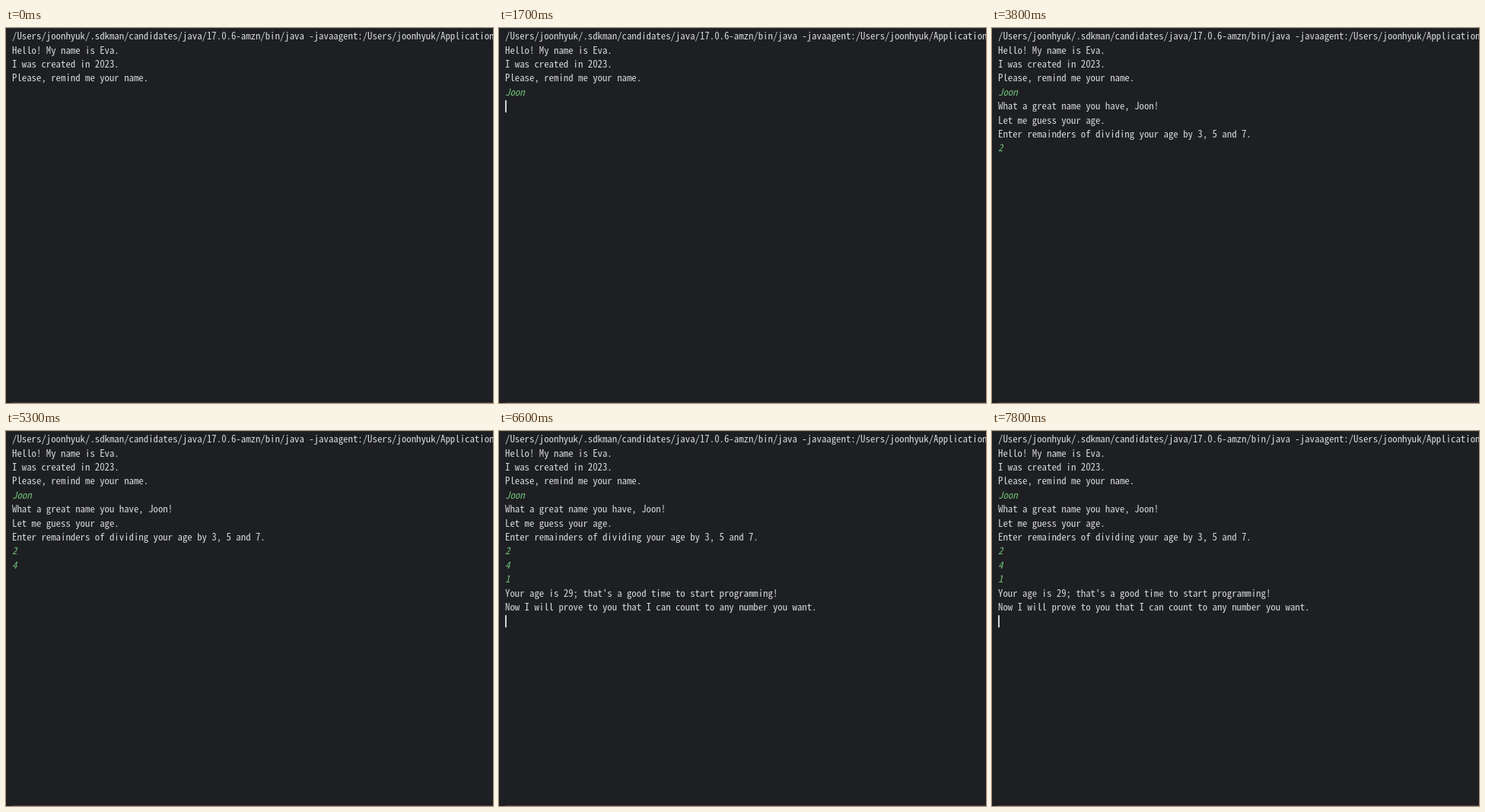
These frames come from a looping animation (640x493 px, 8000 ms). An HTML page:

```html
<!DOCTYPE html>
<html lang="en">
<head>
<meta charset="utf-8">
<title>Console</title>
<style>
  html, body { margin: 0; width: 100%; height: 100%; overflow: hidden; background: #1e1f22; }

  #console {
    --pitch: 18.4px;
    --col: 6.4px;
    position: relative; width: 640px; height: 493px; overflow: hidden;
    background: #1e1f22; color: #d6d7db;
    font: 12.8px/18.4px "Noto Sans Mono CJK KR", "Noto Sans Mono CJK JP", "Noto Sans Mono CJK SC", "Noto Sans Mono", monospace;
    font-variant-ligatures: none; font-kerning: none;
  }
  #console::before, #console::after { content: ""; position: absolute; right: 0; height: 1px; }
  #console::before { left: 0; top: 0; background: #28292c; }
  #console::after { left: 8px; bottom: 0; background: #4b4043; }

  pre { position: absolute; left: 8px; top: 1.2px; margin: 0; font: inherit; }
  i { color: #6fbf78; }

  #caret {
    position: absolute; left: 8px; top: 2.6px; width: 1.6px; height: 16px; background: #d0d2d8;
    transform: translate(calc(var(--x) * var(--col)), calc(var(--y) * var(--pitch)));
    animation: caret 8s step-end infinite;
  }
  @keyframes caret {
    0%     { --x: 0; --y: 4; opacity: 0; }
    3.75%  { --x: 0; --y: 4; opacity: 1; }
    10%    { --x: 0; --y: 4; opacity: 0; }
    11.25% { --x: 1; --y: 4; opacity: 1; }
    12.5%  { --x: 2; --y: 4; opacity: 1; }
    13.75% { --x: 3; --y: 4; opacity: 1; }
    15%    { --x: 4; --y: 4; opacity: 1; }
    21.25% { --x: 0; --y: 5; opacity: 1; }
    23.75% { --x: 0; --y: 8; opacity: 1; }
    35%    { --x: 0; --y: 8; opacity: 0; }
    37.5%  { --x: 1; --y: 8; opacity: 1; }
    47.5%  { --x: 1; --y: 8; opacity: 0; }
    53.75% { --x: 0; --y: 9; opacity: 1; }
    56.25% { --x: 1; --y: 9; opacity: 1; }
    58.75% { --x: 0; --y: 10; opacity: 1; }
    66.25% { --x: 0; --y: 10; opacity: 0; }
    72.5%  { --x: 1; --y: 10; opacity: 1; }
    78.75% { --x: 1; --y: 10; opacity: 0; }
    80%    { --x: 0; --y: 11; opacity: 1; }
    82.5%  { --x: 0; --y: 13; opacity: 1; }
    88.75% { --x: 0; --y: 13; opacity: 0; }
    95%, to { --x: 0; --y: 13; opacity: 1; }
  }

  /* each piece stays hidden until its moment in the loop */
  [class] { opacity: 0; animation: 8s step-end infinite; }
  .key1 { animation-name: key1; }
  .key2 { animation-name: key2; }
  .key3 { animation-name: key3; }
  .key4 { animation-name: key4; }
  .greet { animation-name: greet; }
  .rem3 { animation-name: rem3; }
  .rem5 { animation-name: rem5; }
  .rem7 { animation-name: rem7; }
  .age { animation-name: age; }
  @keyframes key1 { 11.25%, to { opacity: 1; } }
  @keyframes key2 { 12.5%, to { opacity: 1; } }
  @keyframes key3 { 13.75%, to { opacity: 1; } }
  @keyframes key4 { 15%, to { opacity: 1; } }
  @keyframes greet { 23.75%, to { opacity: 1; } }
  @keyframes rem3 { 37.5%, to { opacity: 1; } }
  @keyframes rem5 { 56.25%, to { opacity: 1; } }
  @keyframes rem7 { 72.5%, to { opacity: 1; } }
  @keyframes age { 82.5%, to { opacity: 1; } }
</style>
</head>
<body>
<div id="console">
<pre>/Users/joonhyuk/.sdkman/candidates/java/17.0.6-amzn/bin/java -javaagent:/Users/joonhyuk/Applications
Hello! My name is Eva.
I was created in 2023.
Please, remind me your name.
<i class="key1">J</i><i class="key2">o</i><i class="key3">o</i><i class="key4">n</i>
<span class="greet">What a great name you have, Joon!
Let me guess your age.
Enter remainders of dividing your age by 3, 5 and 7.</span>
<i class="rem3">2</i>
<i class="rem5">4</i>
<i class="rem7">1</i>
<span class="age">Your age is 29; that's a good time to start programming!
Now I will prove to you that I can count to any number you want.</span>
</pre>
<div id="caret"></div>
</div>
</body>
</html>
```
